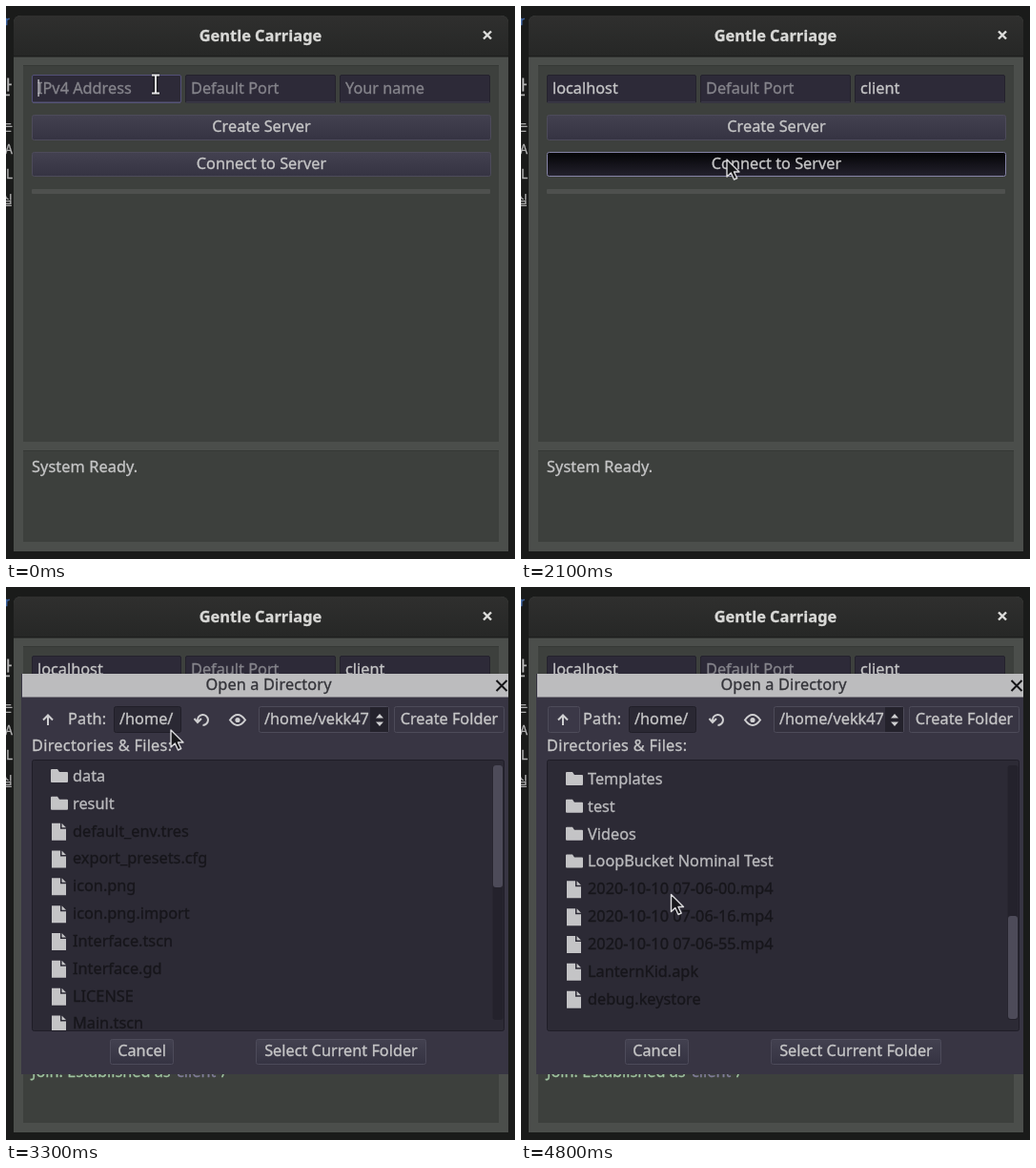
These frames come from a looping animation (534x580 px, 4.9 s). An HTML page:

```html
<!DOCTYPE html>
<html lang="en">
<head>
<meta charset="utf-8">
<title>File transfer demo</title>
<style>
  html, body { margin: 0; width: 100%; height: 100%; overflow: hidden; background: #1a1b1a; }
  svg { display: block; width: 534px; height: 580px; }
  text { font: 16.3px "Noto Sans", "Open Sans", sans-serif; white-space: pre; stroke-width: .3px; }
</style>
</head>
<body>
<svg id="stage" viewBox="0 0 534 580">
  <defs>
    <linearGradient id="bar" x2="0" y2="1"><stop stop-color="#2f2f2e"/><stop offset="1" stop-color="#262726"/></linearGradient>
    <linearGradient id="button" x2="0" y2="1"><stop stop-color="#434150"/><stop offset="1" stop-color="#353342"/></linearGradient>
    <linearGradient id="hover" x2="0" y2="1"><stop stop-color="#4b495b"/><stop offset="1" stop-color="#3d3b4b"/></linearGradient>
    <linearGradient id="pressed" x2="0" y2="1"><stop stop-color="#030305"/><stop offset="1" stop-color="#24222e"/></linearGradient>
    <clipPath id="listClip"><rect x="28" y="182" width="494" height="283"/></clipPath>
  </defs>
  <g id="scene"></g>
</svg>
<script>
const LOOP = 4900, STEP = 100, ROW = 28.83;
const LIGHT = '#c6c6c7', DIM = '#85848b', GREEN = '#9fc3a0';
const scene = document.getElementById('scene');
const ruler = document.createElement('canvas').getContext('2d');
ruler.font = '16.3px "Noto Sans", "Open Sans", sans-serif';

const projectFiles = ['data/', 'result/', 'default_env.tres', 'export_presets.cfg', 'icon.png',
  'icon.png.import', 'Interface.tscn', 'Interface.gd', 'LICENSE', 'Main.tscn', 'Main.gd',
  'project.cfg', 'README.md', 'server.gd', 'client.gd', 'theme.tres', 'font.tres', 'notes.txt'];
const homeFiles = ['Archive/', 'Applications/', 'Backups/', 'bin/', 'Desktop/', 'Documents/', 'Downloads/',
  'Games/', 'Music/', 'Pictures/', 'Projects/', 'Public/', 'Scripts/', 'Sources/', 'Templates/', 'test/',
  'Videos/', 'LoopBucket Nominal Test/', '2020-10-10 07-06-00.mp4', '2020-10-10 07-06-16.mp4',
  '2020-10-10 07-06-55.mp4', 'LanternKid.apk', 'debug.keystore'];

const rect = (x, y, w, h, fill, more = '') =>
  `<rect x="${x}" y="${y}" width="${w}" height="${h}" fill="${fill}" ${more}/>`;
const label = (x, y, str, fill = LIGHT, more = '') =>
  `<text x="${x}" y="${y}" fill="${fill}" stroke="${fill}" ${more}>${str.replace(/&/g, '&amp;')}</text>`;
const path = (d, more) => `<path d="${d}" ${more}/>`;
const middle = 'text-anchor="middle"';
const spaced = px => ` letter-spacing="${px}"`;

// Value of the last [time, value] entry that has been reached.
const at = (track, t) => track.reduce((v, [time, value]) => t >= time ? value : v, track[0][1]);

// Position on straight segments between [time, x, y] points.
function along(points, t) {
  const i = points.findIndex(p => p[0] > t);
  if (i < 0) return points[points.length - 1].slice(1);
  if (i === 0) return points[0].slice(1);
  const [t0, x0, y0] = points[i - 1], [t1, x1, y1] = points[i];
  const k = (t - t0) / (t1 - t0);
  return [x0 + (x1 - x0) * k, y0 + (y1 - y0) * k];
}

function field(x, y, w, h, value, hint, focused) {
  const edge = focused ? '#535078' : '#24222d';
  let out = rect(x + .5, y + .5, w - 1, h - 1, '#2d2a38', `rx="1.5" stroke="${edge}"`);
  out += rect(x + 1, y + h - 1.5, w - 2, 1, focused ? '#5b5878' : '#484654');
  out += label(x + 6, y + 19.5, value || hint, value ? LIGHT : DIM);
  if (focused) out += rect(x + 6.5 + ruler.measureText(value).width, y + 5, 1.2, 18, '#d0d0d4');
  return out;
}

function button(x, y, w, h, str, state = 'button', more = '') {
  const edge = { button: '#4d4b5a', hover: '#646280', pressed: '#8583a6' }[state];
  return rect(x + .5, y + .5, w - 1, h - 1, `url(#${state})`, `rx="2" stroke="${edge}"`) +
    label(x + w / 2, y + 18, str, LIGHT, middle + more);
}

const separator = y => rect(27, y, 481, 5, '#4e504e', 'rx="1"');

function backdrop() {
  const glyph = (x, y, str, size, fill = '#b4b4b4') =>
    label(x, y, str, fill, `style="font:${size}px 'Noto Sans CJK KR','Noto Sans CJK',sans-serif"`);
  return rect(0, 0, 534, 580, '#1a1b1a') +
    glyph(-1, 20, 'r', 12, '#4068a8') + glyph(-12, 93, '란', 20) + glyph(-5, 130, '는', 13) +
    glyph(-1, 155, 'A', 13) + glyph(0, 181, 'L', 13) + glyph(-5, 208, '실', 13) +
    path('M8 572V18q0-8 8-8H519q8 0 8 8V572Z', 'fill="#4b4e4b"') +
    path('M8 53V18q0-8 8-8H519q8 0 8 8V53Z', 'fill="url(#bar)"') +
    rect(8, 52, 519, 1.5, '#1e1f1e') +
    label(267, 37, 'Gentle Carriage', '#d9d9d7', middle + ' style="font-size:16.4px;font-weight:700"') +
    path('M501 26.5l8 8m0-8l-8 8', 'stroke="#dededc" stroke-width="2.4"') +
    rect(18, 62, 499, 395, '#3d403d') + rect(18, 466, 499, 96, '#3d403d') +
    path('M18 62.5H517M18 466.5H517', 'stroke="#353835"');
}

function form(t, connected) {
  const address = 'localhost'.slice(0, at([[0, 0], [200, 1], [300, 3], [400, 4], [500, 6], [600, 7], [700, 9]], t));
  const name = 'client'.slice(0, at([[0, 0], [1000, 1], [1100, 2], [1200, 4], [1300, 5], [1400, 6]], t));
  const focus = at([[0, 'address'], [800, 'port'], [900, 'name'], [2100, '']], t);
  let out = field(27, 72, 157, 30, address, 'IPv4 Address', focus === 'address') +
    field(188, 72, 158, 30, '', 'Default Port', focus === 'port') +
    field(350, 72, 158, 30, name, 'Your name', focus === 'name');
  if (connected) {
    out += label(27, 128.5, 'File will save to:', '#a7897b', spaced(.28)) +
      label(391, 128.5, 'Size per packet', LIGHT, spaced(.1)) +
      field(391, 137, 117, 29, '', '60000', false) +
      button(27, 179, 482, 27, 'Select File', 'button', spaced(.3)) + separator(218);
  } else {
    out += button(27, 114, 482, 27, 'Create Server', at([[0, 'button'], [1800, 'hover'], [1900, 'button']], t)) +
      button(27, 153, 482, 26, 'Connect to Server',
        at([[0, 'button'], [2000, 'hover'], [2100, 'pressed'], [2200, 'hover']], t)) + separator(192);
  }
  out += label(27, 489, 'System Ready.', LIGHT, spaced(.1));
  if (connected) {
    out += label(27, 513.5, 'Join: Established as', GREEN) + label(179, 513.5, 'client', '#817e99') +
      label(226, 513.5, '/', GREEN, 'font-style="italic"');
  }
  return out;
}

function fileRow(name, y) {
  const folder = name.endsWith('/');
  const icon = folder
    ? `M47 ${y - 6}q0-1 1-1h6l2 3h8q1 0 1 1v9q0 1-1 1H48q-1 0-1-1Z`
    : `M48 ${y - 8}h9v6h6v12H48ZM58.5 ${y - 8}l4.5 4.5h-4.5Z`;
  return path(icon, 'fill="#c4c4c6"') +
    label(70, y + 6, folder ? name.slice(0, -1) : name, folder ? '#bababd' : '#17161b');
}

function fileList(t) {
  const home = t >= 4500;
  const files = home ? homeFiles : projectFiles;
  const progress = at([[0, 0], [4600, .3], [4700, .75], [4800, 1]], t);
  const scroll = progress * (14 * ROW - 3);
  const thumb = home ? 108 : 128;
  const rows = files.map((name, i) => [name, 198 + i * ROW - scroll])
    .filter(([, y]) => y > 165 && y < 480)
    .map(([name, y]) => fileRow(name, y)).join('');
  return rect(27.5, 181.5, 495, 284, '#2c2a35', 'rx="2" stroke="#1f1d27"') +
    `<g clip-path="url(#listClip)">${rows}</g>` +
    rect(510.5, 187, 11, 267, '#24222c', 'rx="3"') +
    rect(511, 187 + progress * (266 - thumb), 10, thumb, '#4d4b59', 'rx="3"');
}

function dialog(t) {
  const outline = (x, w, fill = 'none') => rect(x + .5, 125.5, w - 1, 27, fill, 'rx="2" stroke="#4d4b59"');
  const stroke = 'fill="none" stroke="#cfcfd1" stroke-width="2"';
  return rect(16, 91, 511, 420, '#383543') + rect(17, 91, 510, 24.5, '#bcbcbe') +
    label(275.5, 108, 'Open a Directory', '#34343a', middle + spaced(.15)) +
    path('M514.5 98l11 11m0-11l-11 11', 'stroke="#141417" stroke-width="2"') +
    (t >= 4400 ? outline(28, 34, '#3b3847') : '') +
    path('M44 145v-10m-5 4.5l5-5 5 5', stroke) +
    label(65, 144, 'Path:', LIGHT, spaced(.2)) +
    rect(113.5, 125.5, 70, 27, '#2a2833', 'rx="2" stroke="#201e28"') + label(119, 144, '/home/') +
    path('M201 140a5.5 5.5 0 1 1 5.5 5M197.5 138l3.5 4 4-4', stroke) +
    path('M235 139.5q8-11 16 0q-8 11-16 0Z', stroke) +
    '<circle cx="243" cy="139.5" r="2.6" fill="#cfcfd1"/>' +
    outline(265, 137, '#34313e') + rect(382, 126, 19, 26, '#24222c') + label(271, 144, '/home/vekk47') +
    path('M388 137.5l4-4.5 4 4.5ZM388 141.5l4 4.5 4-4.5Z', 'fill="#cfcfd1"') +
    outline(407, 116) + label(465, 144, 'Create Folder', LIGHT, middle) +
    label(27, 171.5, 'Directories & Files:', LIGHT, spaced(.28)) + fileList(t) +
    button(109, 474, 67, 27, 'Cancel') + button(262, 474, 179, 27, 'Select Current Folder');
}

function pointer(t) {
  if (t < 1700) {
    const [x, y] = along([[1500, 157, 82], [1700, 168, 98]], t);
    const beam = `M${x - 4} ${y - 9.5}h8M${x} ${y - 9.5}v19M${x - 4} ${y + 9.5}h8`;
    return path(beam, 'stroke="#1c1c20" stroke-width="4.5"') + path(beam, 'stroke="#e4e4e6" stroke-width="2"');
  }
  const [x, y] = along([[1700, 168, 104], [1900, 200, 143], [2000, 212, 157], [2100, 216, 161],
    [3000, 216, 161], [3100, 190, 153], [3200, 173, 150], [3600, 173, 150], [3800, 140, 150],
    [4000, 78, 147], [4200, 47, 143], [4500, 47, 143], [4600, 105, 240], [4700, 150, 312], [4800, 157.5, 322.5]], t);
  return path(`M${x} ${y}v18l4.3-4 3.2 7 3.2-1.5-3.2-6.5h5.5Z`,
    'fill="#17171a" stroke="#dcdcde" stroke-width="1.4" stroke-linejoin="round"');
}

function draw(t) {
  scene.innerHTML = backdrop() + form(t, t >= 2300) + (t >= 3300 ? dialog(t) : '') + pointer(t);
}

let shown = -1;
const start = performance.now();
function tick() {
  const t = Math.floor(((performance.now() - start) % LOOP) / STEP) * STEP;
  if (t !== shown) draw(shown = t);
  requestAnimationFrame(tick);
}
tick();
</script>
</body>
</html>
```
